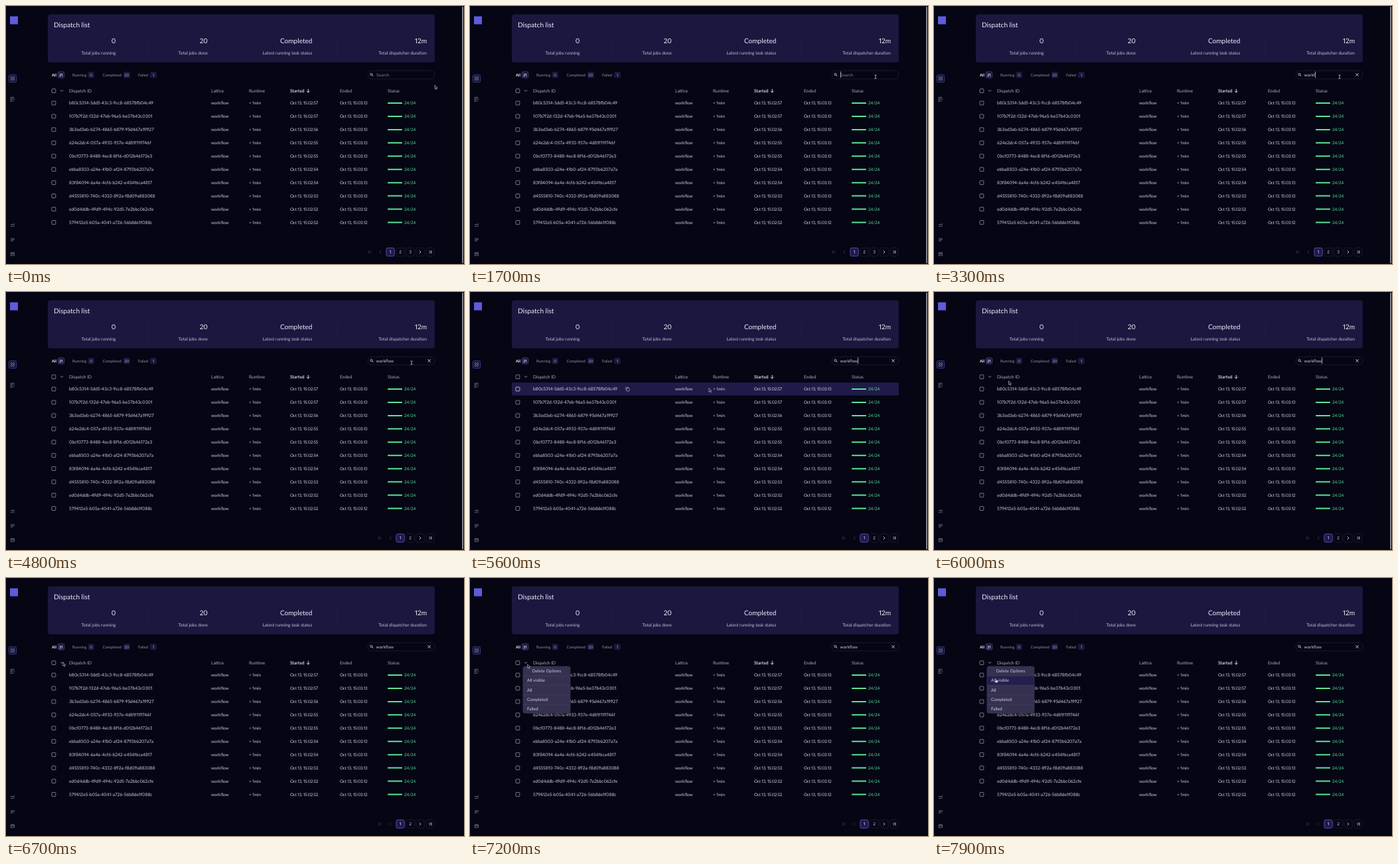
These frames come from a looping animation (690x388 px, 8 s). An HTML page:

```html
<!DOCTYPE html>
<html lang="en">
<head>
<meta charset="utf-8">
<title>Dispatch list</title>
<style>
html, body { margin: 0; width: 100%; height: 100%; overflow: hidden; background: #050514; }
svg { display: block; width: 100vw; height: 100vh; }
text {
  font-family: Lato, "Open Sans", sans-serif;
  font-variant-numeric: proportional-nums;
  text-rendering: geometricPrecision;
  white-space: pre;
}
</style>
</head>
<body>
<svg id="stage" viewBox="0 0 690 388"></svg>
<script>
const NS = "http://www.w3.org/2000/svg";
const stage = document.getElementById("stage");
const LOOP = 8000, STEP = 100;
const ROW_TOP = 146, ROW_GAP = 19.94;
const C = {
  card: "#1b173f", line: "#21203a", bright: "#ececf6", text: "#d0d0e0",
  soft: "#acacc0", dim: "#77778f", faint: "#3f3f55", accent: "#5c58c4", green: "#5be396"
};

function add(parent, tag, attrs) {
  const el = document.createElementNS(NS, tag);
  for (const k in attrs) el.setAttribute(k, attrs[k]);
  parent.appendChild(el);
  return el;
}
const group = (parent = stage) => add(parent, "g", {});
const rect = (p, x, y, width, height, fill, more = {}) =>
  add(p, "rect", { x, y, width, height, fill, ...more });
const stroke = (p, d, color, w = 0.8, more = {}) =>
  add(p, "path", { d, fill: "none", stroke: color, "stroke-width": w,
    "stroke-linecap": "round", "stroke-linejoin": "round", ...more });
// cy is the middle of the capital letters
function label(p, str, x, cy, size, fill, more = {}) {
  const el = add(p, "text", { x, y: cy + size * 0.355, "font-size": size, fill, ...more });
  el.textContent = str;
  return el;
}
const show = (el, on) => el.setAttribute("visibility", on ? "visible" : "hidden");

function sidebar() {
  const g = group();
  rect(g, 6, 15.5, 12, 12, "#5f5bdc");
  rect(g, 4.4, 103.4, 11.2, 11.2, "#11102c", { rx: 2, stroke: "#4c489c", "stroke-width": 0.8 });
  for (const [x, y] of [[7.2, 106.2], [10.6, 106.2], [7.2, 109.6], [10.6, 109.6]])
    rect(g, x, y, 2.2, 2.2, "none", { rx: 0.5, stroke: "#9c99dc", "stroke-width": 0.6 });
  stroke(g, "M12 138.5V137.2H7V143.4H9.5 M8.3 139H10.8 M8.3 140.8H9.8 M10.5 143.2L13 140.2", C.dim);
  stroke(g, "M7.3 328.5H12.7L11.5 327.3 M12.7 331H7.3L8.5 332.2", C.dim);
  stroke(g, "M7.4 349.8H12.6 M7.4 351.6H12.6 M7.4 353.4H10", C.dim);
  stroke(g, "M7.6 371H12.4V375.4H7.6Z M7.6 372.8H12.4 M9.2 370.4V371 M10.8 370.4V371", C.dim);
}

function summary() {
  const g = group();
  rect(g, 63, 12.5, 583, 72.3, C.card, { rx: 4 });
  label(g, "Dispatch list", 72, 28.8, 10.1, C.bright);
  const end = { "text-anchor": "end" };
  [["0", "Total jobs running", 165.5], ["20", "Total jobs done", 304],
   ["Completed", "Latest running task status", 461.5], ["12m", "Total dispatcher duration", 634]]
    .forEach(([value, name, x]) => {
      label(g, value, x, 52.6, 10.1, C.bright, end);
      label(g, name, x, 70.6, 6.7, "#bfbed2", end);
    });
  for (const x of [213.5, 356.5, 498.5]) rect(g, x - 0.4, 46, 0.8, 28, "#231f49");
}

function tabs() {
  const g = group();
  [["All", 69, "21", 78], ["Running", 100, "0", 123.3],
   ["Completed", 145.5, "20", 177], ["Failed", 199, "1", 217]]
    .forEach(([name, x, count, bx], i) => {
      label(g, name, x, 103.5, 5.9, i ? "#8d8da3" : C.bright, { "font-weight": i ? 400 : 700 });
      rect(g, bx, 98.8, 9.8, 9.4, C.card,
        { rx: 2.2, stroke: i ? "none" : "#4c489c", "stroke-width": 0.7 });
      label(g, count, bx + 4.9, 103.5, 5.9, i ? "#a9a8c4" : C.bright,
        { "text-anchor": "middle", "font-weight": i ? 400 : 700 });
    });
}

function search() {
  const g = group();
  rect(g, 545, 97.3, 101, 12.4, "none", { rx: 6.2, stroke: C.line, "stroke-width": 0.8 });
  add(g, "circle", { cx: 550.4, cy: 102.8, r: 1.6, fill: "none", stroke: C.text, "stroke-width": 0.8 });
  stroke(g, "M551.7 104.1L553 105.4", C.text, 0.9);
  const hint = label(g, "Search", 558, 103.4, 6.5, "#80809a");
  const value = label(g, "", 557.5, 103.4, 6.4, C.text);
  const clear = stroke(g, "M635.7 101.6L639.3 105.2M639.3 101.6L635.7 105.2", C.bright, 0.9);
  const caret = rect(g, 558, 98.6, 0.7, 9.4, C.bright);
  return { hint, value, clear, caret };
}

const checkbox = (p, cy) =>
  rect(p, 69, cy - 2.9, 5.8, 5.8, "none", { rx: 0.7, stroke: "#9494aa", "stroke-width": 0.8 });

function table() {
  const g = group();
  checkbox(g, 127.6);
  stroke(g, "M82.2 126.6L84 128.4L85.8 126.6", C.soft);
  [["Dispatch ID", 95], ["Lattice", 309], ["Runtime", 366], ["Ended", 503], ["Status", 575]]
    .forEach(([name, x]) => label(g, name, x, 127.6, 6.6, C.soft));
  label(g, "Started", 428, 127.6, 6.7, C.bright, { "font-weight": 600 });
  stroke(g, "M455.3 125.2V130M453.3 128L455.3 130L457.3 128", C.bright, 0.9);

  const hover = group(g);
  rect(hover, 63, 136.2, 583, 19.4, "#1f1b49");
  rect(hover, 236, 144.6, 4, 4.4, "none", { rx: 0.6, stroke: C.soft, "stroke-width": 0.7 });
  stroke(hover, "M234.8 147.2V143.4H238.4", C.soft, 0.7);
  checkbox(hover, ROW_TOP);

  const date = { "letter-spacing": -0.2 };
  [["b80c5314-5dd5-43c3-9cc8-68578fb04c49", 57], ["107b7f2d-132d-47eb-96a5-be37b43c0301", 57],
   ["3b3ed3eb-b274-4865-b879-95d467a19927", 56], ["624e2dc4-057a-4933-937e-4d81f119746f", 55],
   ["0bcf0773-8488-4ec8-8f16-d012b46172e3", 55], ["ebba8503-a24e-41b0-af24-8793b6207a7a", 54],
   ["83f84094-6a4e-4cf6-b242-e454f6ca4817", 54], ["d4555810-740c-4332-892a-f8d09a883088", 53],
   ["ed0d4ddb-49d9-494c-92d5-7e2bbc062cfe", 52], ["579412e5-b05a-4041-a726-56b8de1f088c", 52]]
    .forEach(([id, sec], i) => {
      const y = ROW_TOP + i * ROW_GAP;
      checkbox(g, y);
      label(g, id, 95, y, 6.7, C.text);
      label(g, "workflow", 309, y, 6.4, C.text);
      label(g, "< 1min", 366, y, 6.3, C.text);
      label(g, "Oct 13, 15:02:" + sec, 428, y, 6.4, C.text, date);
      label(g, "Oct 13, 15:03:" + (i < 8 ? 13 : 12), 503, y, 6.4, C.text, date);
      rect(g, 575, y - 1, 22, 2, C.green, { rx: 0.6 });
      label(g, "24/24", 600, y, 6.3, C.green);
    });
  return hover;
}

function pager(pages) {
  const g = group();
  const y = 370, first = 609 - pages * 15;
  const box = (x, on) => rect(g, x - 6.2, y - 6.2, 12.4, 12.4, on ? "#1f1b49" : "none",
    { rx: 2.4, stroke: on ? C.accent : C.line, "stroke-width": 0.8 });
  const chevron = (x, dir, color, bar) => {
    stroke(g, `M${x - dir} ${y - 2}L${x + dir} ${y}L${x - dir} ${y + 2}`, color);
    if (bar) stroke(g, `M${x + 2.4 * dir} ${y - 2}V${y + 2}`, color);
  };
  chevron(first - 15, -1, C.faint, true);
  chevron(first, -1, C.faint);
  for (let n = 1; n <= pages; n++) {
    const x = first + n * 15;
    box(x, n === 1);
    label(g, n, x, y, 6.4, n === 1 ? C.bright : C.text, { "text-anchor": "middle" });
  }
  box(624);
  box(639);
  chevron(624, 1, C.bright);
  chevron(638.5, 1, C.bright, true);
  return g;
}

function menu() {
  const g = group();
  rect(g, 79.5, 132.4, 72, 71.4, "#35314f", { rx: 4 });
  const mark = rect(g, 79.5, 147, 72, 14, "#241f4d");
  for (const y of [147, 161.2, 175.6, 190]) rect(g, 79.5, y, 72, 0.5, "#454160");
  label(g, "Delete Options", 115.5, 139.3, 6.5, "#c9c8da", { "text-anchor": "middle" });
  ["All visible", "All", "Completed", "Failed"].forEach((name, i) =>
    label(g, name, 86, 153.9 + i * 14.4, 6.5, "#d0cfe0"));
  return { g, mark };
}

function pointers() {
  const edge = { "stroke-width": 0.55, "stroke-linejoin": "round" };
  const arrow = add(stage, "path", { ...edge, fill: "#14141c", stroke: "#dcdce6",
    d: "M0 0V5.6L1.3 4.5L2.2 6.6L3.2 6.2L2.3 4.1H4Z" });
  const hand = add(stage, "path", { ...edge, fill: "#e8e8f0", stroke: "#20202c",
    d: "M-.6 .6Q0-.3 .6 .6V2.6L2.6 3Q3.3 3.2 3.1 4L2.6 6.4H-.6L-2.2 4Q-2 3.2-1.4 3.6L-.6 4.2Z" });
  const beam = group();
  stroke(beam, "M-1.2-2.7Q-.1-2.7 0-2Q.1-2.7 1.2-2.7M0-2V2M-1.2 2.7Q-.1 2.7 0 2Q.1 2.7 1.2 2.7", "#e2e2ec", 0.7);
  return { arrow, hand, beam };
}

rect(stage, 0, 0, 690, 388, "#050514");
const thumb = rect(stage, 687, 1, 2, 386, "#85858f", { rx: 1 });
sidebar();
summary();
tabs();
const field = search();
const hover = table();
const threePages = pager(3), twoPages = pager(2);
const options = menu();
const cursors = pointers();

// time, x, y of the pointer tip
const PATH = [
  [0, 646, 119], [800, 646, 119], [900, 640, 117.5], [1000, 628, 114.5], [1100, 617, 111.5],
  [1200, 611.5, 110.3], [1400, 611.5, 110.3], [1500, 611, 108], [1700, 611, 106.5],
  [5200, 611, 106.5], [5300, 600, 110], [5500, 470, 140], [5700, 250, 149], [5900, 131, 140.5],
  [6100, 94, 127], [6200, 94, 127], [6300, 87, 126.6], [6500, 85.7, 126.6], [7100, 85.7, 126.6],
  [7900, 93.2, 151.2], [8000, 93.2, 151.2]
];
const TYPED = [[2500, "w"], [2800, "wo"], [2900, "wor"], [3100, "work"],
  [3300, "workf"], [3500, "workfl"], [3700, "workflow"]];

function tipAt(t) {
  const i = Math.max(1, PATH.findIndex(k => k[0] > t));
  const a = PATH[i - 1], b = PATH[i], u = (t - a[0]) / (b[0] - a[0]);
  return [a[1] + (b[1] - a[1]) * u, a[2] + (b[2] - a[2]) * u];
}
const within = (t, a, b) => t >= a && t < b;

function draw(time) {
  const t = Math.floor(time / STEP) * STEP;
  const [x, y] = tipAt(t);
  const open = t >= 6900;
  const onRow = !open && y > 136 && y < 155.8;
  const onItem = open && y >= 147;
  const kind = within(t, 1500, 5300) ? "beam" : onItem || (onRow && x < 228) ? "hand" : "arrow";
  for (const k in cursors) {
    show(cursors[k], k === kind);
    cursors[k].setAttribute("transform", `translate(${x} ${y})`);
  }

  const typed = TYPED.reduce((s, [at, word]) => (t >= at ? word : s), "");
  field.value.textContent = typed;
  show(field.hint, !typed);
  show(field.clear, typed);
  show(field.caret, within(t, 1700, 4100) || within(t, 5400, 6500));
  field.caret.setAttribute("x", typed ? 557.8 + field.value.getComputedTextLength() : 558);

  show(hover, onRow);
  show(threePages, t < 4800);
  show(twoPages, t >= 4800);
  show(thumb, t < 6700);
  show(options.g, open);
  options.g.setAttribute("opacity", t < 7000 ? 0.65 : 1);
  show(options.mark, onItem);
}

const start = performance.now();
function tick() {
  draw((performance.now() - start) % LOOP);
  requestAnimationFrame(tick);
}
tick();
</script>
</body>
</html>
```
